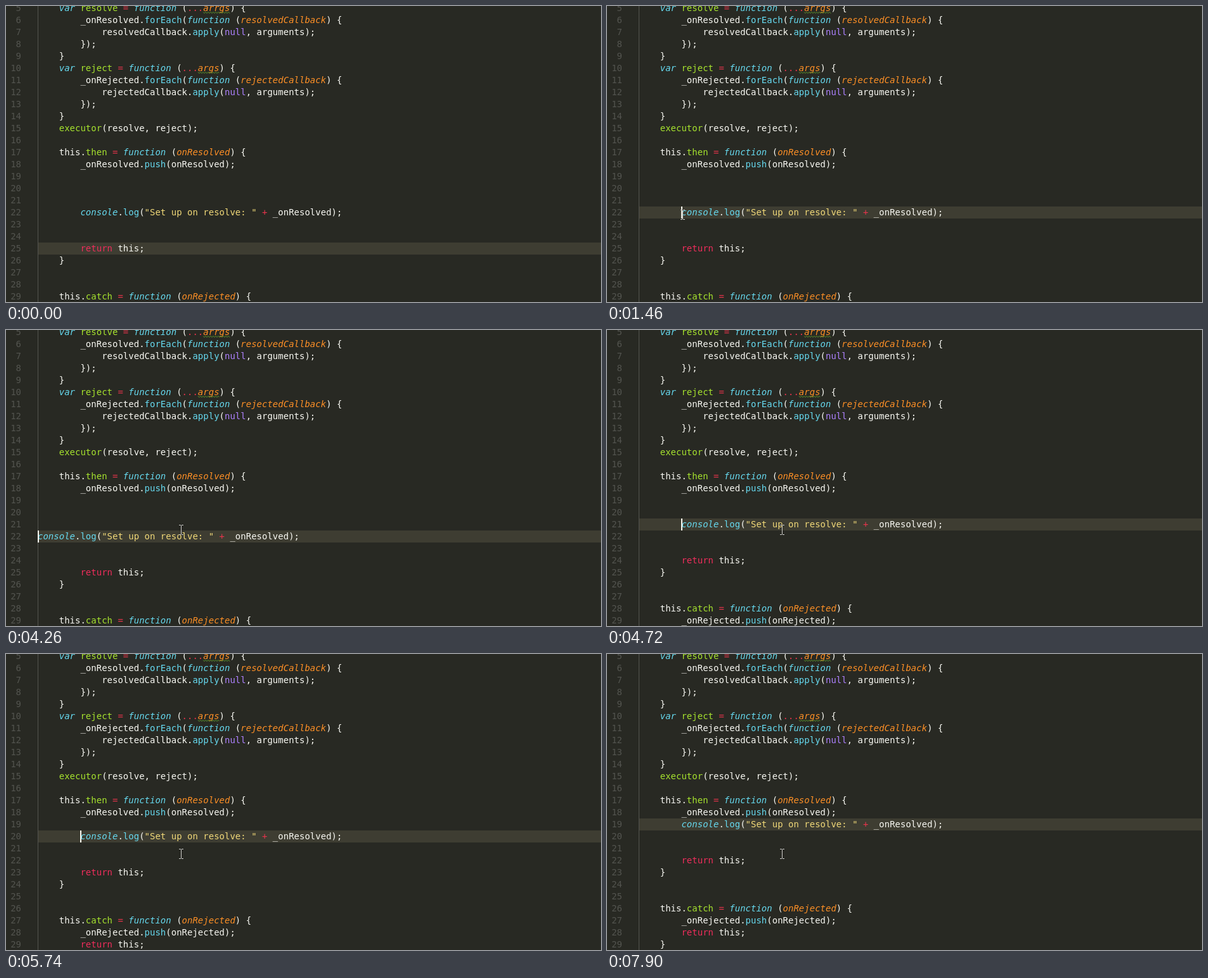
Recreate the animation shown at these times as an HTML page with a canvas. Size 939 by 468 pixels, loop 8 s.

```html
<!DOCTYPE html>
<html lang="en">
<head>
<meta charset="utf-8">
<title>Code editor</title>
<style>
html, body { margin: 0; width: 100%; height: 100%; overflow: hidden; background: #282923; }
canvas { display: block; }
</style>
</head>
<body>
<canvas id="stage" width="939" height="468"></canvas>
<script>
const ctx = document.getElementById('stage').getContext('2d');
const W = 939, H = 468, LOOP = 8000;
const LINE = 19, LEFT = 50, TOP = -6, FIRST = 5, LAST = 29, ASCENT = 14;
const FONT = '14px "DejaVu Sans Mono", monospace';

ctx.font = FONT;
const CHAR = ctx.measureText('0'.repeat(100)).width / 100;

const COLORS = {
  back: '#282923', active: '#3e3d32', gutter: '#53544f', plain: '#f8f8f2',
  string: '#f0d878', param: '#fd8f26', storage: '#66d9ef', name: '#a6e22e',
  call: '#66d9ef', constant: '#ae81ff', operator: '#e8344c', keyword: '#f02d5c',
  squiggle: '#5f9a2e'
};
const ITALIC = ['param', 'storage'];

const SYNTAX = new RegExp([
  '(?<string>"[^"]*")',
  '(?<param>(?<=function \\((?:\\.{3})?)\\w+)',
  '(?<storage>\\b(?:var|function|console)\\b)',
  '(?<name>\\w+(?= = function)|executor)',
  '(?<call>(?<=\\.)(?:forEach|push|apply|log)\\b)',
  '(?<constant>\\bnull\\b)',
  '(?<keyword>\\breturn\\b)',
  '(?<operator>\\.{3}|[=+])'
].join('|'), 'g');

const HEAD = `    var resolve = function (...arrgs) {
        _onResolved.forEach(function (resolvedCallback) {
            resolvedCallback.apply(null, arguments);
        });
    }
    var reject = function (...args) {
        _onRejected.forEach(function (rejectedCallback) {
            rejectedCallback.apply(null, arguments);
        });
    }
    executor(resolve, reject);

    this.then = function (onResolved) {
        _onResolved.push(onResolved);`.split('\n');

const LOG = 'console.log("Set up on resolve: " + _onResolved);';

const TAIL = `

        return this;
    }


    this.catch = function (onRejected) {
        _onRejected.push(onRejected);
        return this;
    }`.split('\n');

// time, line of the log call, its indent, active line, caret shown
const EDITS = [
  [0, 22, 8, 25, false],
  [1460, 22, 8, 22, true],
  [1920, 22, 8, 22, false],
  [2470, 22, 8, 22, true],
  [2770, 22, 4, 22, true],
  [3320, 22, 4, 22, false],
  [3780, 22, 4, 22, true],
  [4260, 22, 0, 22, true],
  [4720, 21, 8, 21, true],
  [5100, 21, 4, 21, true],
  [5480, 21, 0, 21, true],
  [5740, 20, 8, 20, true],
  [6030, 20, 4, 20, true],
  [6200, 20, 0, 20, true],
  [6430, 19, 8, 19, true],
  [6890, 19, 8, 19, false],
  [7440, 19, 8, 19, true],
  [7900, 19, 8, 19, false]
];

// time, x, y of the pointer
const POINTER = [
  [130, 290, 335], [210, 264, 327], [360, 182, 339], [440, 136, 344],
  [590, 120, 343], [665, 109, 340], [740, 106, 335],
  [990, 108, 334], [1065, 111, 333], [1140, 114, 332], [1215, 117, 331], [1290, 119, 330],
  [1610, 160, 326], [1685, 238, 319], [1760, 276, 316]
];

const latest = (steps, t) => steps.filter(step => step[0] <= t).pop();
const rowTop = line => TOP + (line - FIRST) * LINE;
const colX = col => LEFT + col * CHAR;

function drawRun(text, col, y, kind) {
  if (!text.trim()) return;
  ctx.font = (ITALIC.includes(kind) ? 'italic ' : '') + FONT;
  ctx.fillStyle = COLORS[kind];
  ctx.fillText(text, colX(col), y);
}

function drawSquiggle(col, length, y) {
  ctx.strokeStyle = COLORS.squiggle;
  ctx.lineWidth = 1;
  ctx.beginPath();
  for (let x = colX(col), end = colX(col + length); x <= end; x += 0.5) {
    ctx.lineTo(x, y + Math.sin(x * Math.PI / 2));
  }
  ctx.stroke();
}

function drawCode(text, y) {
  let col = 0;
  for (const match of text.matchAll(SYNTAX)) {
    const kind = Object.keys(match.groups).find(key => match.groups[key] !== undefined);
    drawRun(text.slice(col, match.index), col, y, 'plain');
    drawRun(match[0], match.index, y, kind);
    col = match.index + match[0].length;
    if (/^arr?gs$/.test(match[0])) drawSquiggle(match.index, match[0].length, y + 2.5);
  }
  drawRun(text.slice(col), col, y, 'plain');
}

function drawPointer(x, y) {
  const bar = (color, grow) => {
    ctx.fillStyle = color;
    for (const [dx, dy, w, h] of [[-3, -8, 3, 1], [1, -8, 3, 1], [0, -7, 1, 14], [-3, 7, 3, 1], [1, 7, 3, 1]]) {
      ctx.fillRect(x + dx - grow, y + dy - grow, w + 2 * grow, h + 2 * grow);
    }
  };
  bar('rgba(20, 20, 18, 0.35)', 0.5);
  bar('#d4d4d0', 0);
}

function draw(t) {
  const [, logLine, indent, activeLine, caret] = latest(EDITS, t);
  const blanks = Array(logLine - FIRST - HEAD.length).fill('');
  const lines = [...HEAD, ...blanks, ' '.repeat(indent) + LOG, ...TAIL];

  ctx.fillStyle = COLORS.back;
  ctx.fillRect(0, 0, W, H);
  ctx.fillStyle = COLORS.active;
  ctx.fillRect(51, rowTop(activeLine), W - 51, LINE);
  ctx.fillStyle = COLORS.gutter;
  ctx.fillRect(50, 0, 1, H);

  for (let line = FIRST; line <= LAST; line++) {
    const y = rowTop(line) + ASCENT;
    ctx.font = FONT;
    ctx.fillStyle = COLORS.gutter;
    ctx.textAlign = 'right';
    ctx.fillText(line, 24, y);
    ctx.textAlign = 'left';
    drawCode(lines[line - FIRST] || '', y);
  }

  if (caret) {
    ctx.fillStyle = '#f8f8f0';
    ctx.fillRect(Math.round(colX(indent)), rowTop(logLine), 2, LINE);
  }
  const pointer = latest(POINTER, t);
  if (pointer) drawPointer(pointer[1], pointer[2]);
}

const start = performance.now();
function tick() {
  draw((performance.now() - start) % LOOP);
  requestAnimationFrame(tick);
}
tick();
</script>
</body>
</html>
```
